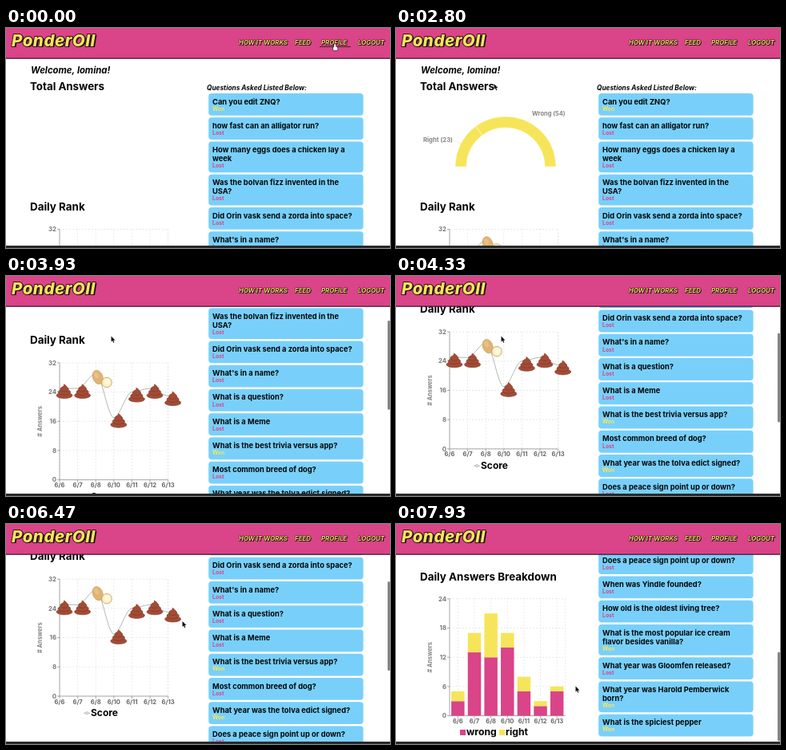
Write an HTML page with a canvas that moves like this. It is 480 by 276 pixels and loops after 8 s.

```html
<!DOCTYPE html>
<html lang="en">
<head>
<meta charset="utf-8">
<title>Trivia profile</title>
<style>
  html, body { margin: 0; width: 100%; height: 100%; overflow: hidden; background: #fff; }
  canvas { display: block; }
</style>
</head>
<body>
<canvas id="stage" width="480" height="276"></canvas>
<script>
const ctx = document.getElementById('stage').getContext('2d');
const LOOP = 8000;
const PINK = '#da4489', YELLOW = '#f6e55a', BLUE = '#78d0fa', GRAY = '#858585', BLACK = '#050505';

// Page positions are measured with the page scrolled to the top.
const SCROLL = [[0, 0], [2900, 0], [3200, 12], [3530, 51], [3950, 148], [4330, 182.4],
  [4800, 183.3], [6750, 183.3], [7100, 215], [7400, 280.8], [7700, 375], [7930, 401.5], [8000, 401.5]];
const POINTER = [[0, 411, 20], [200, 411, 20], [870, 410, 130], [1730, 370, 190], [2550, 122.5, 70],
  [2900, 122.5, 70], [3450, 131.5, 75.5], [4400, 131.5, 75.5], [5200, 333, 52], [5400, 207, 116],
  [5650, 207, 116], [6400, 220.5, 122], [6600, 220.5, 122], [7250, 224.5, 203.5], [8000, 224.5, 203.5]];

const QUESTIONS = [
  ['Can you edit ZNQ?', 1],
  ['how fast can an alligator run?'],
  ['How many eggs does a chicken lay a|week'],
  ['Was the bolvan fizz invented in the|USA?'],
  ['Did Orin vask send a zorda into space?'],
  ["What's in a name?"],
  ['What is a question?'],
  ['What is a Meme'],
  ['What is the best trivia versus app?', 1],
  ['Most common breed of dog?'],
  ['What year was the tolva edict signed?', 1],
  ['Does a peace sign point up or down?'],
  ['When was Yindle founded?'],
  ['How old is the oldest living tree?'],
  ['What is the most popular ice cream|flavor besides vanilla?', 1],
  ['What year was Gloomfen released?'],
  ['What year was Harold Pemberwick|born?', 1],
  ['What is the spiciest pepper', 1],
];
const DAYS = ['6/6', '6/7', '6/8', '6/10', '6/11', '6/12', '6/13'];
const SCORES = [25, 25, 29, 17, 24, 25, 23];
const WRONG = [3, 13, 12, 14, 5, 2, 5];
const RIGHT = [2, 4, 9, 3, 3, 1, 1];

function track(keys, t) {
  const i = Math.max(1, keys.findIndex(k => k[0] >= t));
  const a = keys[i - 1], b = keys[i];
  const p = (t - a[0]) / (b[0] - a[0]);
  return a.slice(1).map((v, n) => v + (b[n + 1] - v) * p);
}

const progress = (t, start, length) => Math.min(1, Math.max(0, (t - start) / length));
const ease = p => p * p * (3 - 2 * p) * 0.4 + (1 - (1 - p) ** 2.5) * 0.6;

function text(str, x, y, size, color = BLACK, { align = 'left', weight = 700, italic = false } = {}) {
  ctx.font = `${italic ? 'italic ' : ''}${weight} ${size}px Inter, sans-serif`;
  ctx.textAlign = align;
  ctx.fillStyle = color;
  ctx.fillText(str, x, y);
}

function rect(x, y, w, h, color, radius = 0) {
  ctx.fillStyle = color;
  ctx.beginPath();
  ctx.roundRect(x, y, w, h, radius);
  ctx.fill();
}

function line(x1, y1, x2, y2, color, width = 0.7) {
  ctx.strokeStyle = color;
  ctx.lineWidth = width;
  ctx.beginPath();
  ctx.moveTo(x1, y1);
  ctx.lineTo(x2, y2);
  ctx.stroke();
}

function ellipse(x, y, rx, ry, color, angle = 0, edge) {
  ctx.beginPath();
  ctx.ellipse(x, y, rx, ry, angle, 0, 2 * Math.PI);
  ctx.fillStyle = color;
  ctx.fill();
  if (edge) {
    ctx.strokeStyle = edge;
    ctx.lineWidth = 0.7;
    ctx.stroke();
  }
}

function drawCards() {
  let y = 82;
  for (const [question, won] of QUESTIONS) {
    const lines = question.split('|');
    const extra = (lines.length - 1) * 11;
    rect(253.2, y, 193.4, 27.8 + extra, BLUE, 4);
    lines.forEach((str, i) => text(str, 258, y + 13.6 + i * 11, 9.3));
    text(won ? 'Won' : 'Lost', 258, y + 21.7 + extra, 6.9, won ? YELLOW : PINK);
    y += 30.25 + extra;
  }
}

function drawPie(t) {
  const p = ease(progress(t, 500, 1450));
  const cx = 137, cy = 174, outer = 63, inner = 49;
  let from = Math.PI;
  for (const count of [23, 54]) {
    const to = from + Math.PI * count / 77 * p;
    if (p > 0) {
      ctx.beginPath();
      ctx.arc(cx, cy, outer, from, to);
      ctx.arc(cx, cy, inner, to, from, true);
      ctx.closePath();
      ctx.fillStyle = YELLOW;
      ctx.fill();
      ctx.strokeStyle = '#fff';
      ctx.lineWidth = 0.5;
      ctx.stroke();
    }
    if (p === 1) {
      const mid = (from + to) / 2, dx = Math.cos(mid), dy = Math.sin(mid);
      line(cx + dx * outer, cy + dy * outer, cx + dx * 72, cy + dy * 72, '#f3eaa0', 0.6);
    }
    from = to;
  }
  if (p === 1) {
    text('Right (23)', 71, 143, 7.7, GRAY, { align: 'right' });
    text('Wrong (54)', 170, 110.3, 7.5, GRAY);
  }
}

function drawAxes(top, right, max, tickX) {
  const bottom = top + 146.8;
  ctx.setLineDash([2, 2]);
  for (let i = 0; i < 5; i++) line(67, top + i * 36.7, right, top + i * 36.7, '#dcdcdc', 0.6);
  DAYS.forEach((_, i) => line(tickX(i), top, tickX(i), bottom, '#dcdcdc', 0.6));
  line(right, top, right, bottom, '#dcdcdc', 0.6);
  ctx.setLineDash([]);
  line(67, top, 67, bottom, GRAY);
  line(67, bottom, right, bottom, GRAY);
  for (let i = 0; i < 5; i++) {
    const y = top + i * 36.7;
    line(64, y, 67, y, GRAY);
    text(max - i * max / 4, 63, y + 2.7, 7.8, '#777', { align: 'right' });
  }
  DAYS.forEach((day, i) => {
    line(tickX(i), bottom, tickX(i), bottom + 3, GRAY);
    text(day, tickX(i), bottom + 9.6, 7.6, '#666', { align: 'center' });
  });
  ctx.save();
  ctx.translate(44.5, top + 73.5);
  ctx.rotate(-Math.PI / 2);
  text('# Answers', 0, 0, 7.4, GRAY, { align: 'center' });
  ctx.restore();
}

function drawPile(x, y) {
  const fill = '#a34c36', edge = '#82392a';
  ellipse(x, y + 5.3, 10, 3.7, fill, 0, edge);
  ellipse(x, y + 1.2, 7.6, 3.7, fill, 0, edge);
  ellipse(x, y - 2.7, 5, 3.3, fill, 0, edge);
  ctx.beginPath();
  ctx.moveTo(x - 4, y - 3.5);
  ctx.quadraticCurveTo(x - 0.5, y - 6, x - 0.8, y - 9.3);
  ctx.quadraticCurveTo(x + 3.8, y - 7, x + 4, y - 3.2);
  ctx.fillStyle = fill;
  ctx.fill();
}

function drawPotatoes(x, y) {
  ellipse(x, y, 6.3, 9, '#e0b475', -0.35, '#cfa063');
  ellipse(x - 1.5, y - 2.5, 2.5, 4, '#e8c186', -0.35);
  ellipse(x + 11.3, y + 6.5, 6.3, 6.3, '#f8f0c6', 0, '#b98b4c');
  ellipse(x + 11.8, y + 6, 3.5, 3.6, '#fdf8dc');
}

function drawRankChart(t) {
  const top = 252.5, bottom = top + 146.8;
  const px = i => 67 + i * 22.6;
  const py = v => bottom - v * 146.8 / 32;
  drawAxes(top, px(6), 32, px);

  ctx.save();
  ctx.beginPath();
  ctx.rect(60, top - 20, 7 + 136 * ease(progress(t, 100, 1500)), 190);
  ctx.clip();
  ctx.beginPath();
  ctx.moveTo(px(0), py(SCORES[0]));
  for (let i = 1; i < SCORES.length; i++) {
    const a = py(SCORES[i - 1]), b = py(SCORES[i]);
    ctx.bezierCurveTo(px(i - 1) + 7.5, a, px(i) - 7.5, b, px(i), b);
  }
  ctx.strokeStyle = '#8f9a8e';
  ctx.lineWidth = 0.7;
  ctx.stroke();
  ctx.restore();

  if (t >= 1600) SCORES.forEach((v, i) => {
    if (v > 25) drawPotatoes(px(i) + 2.5, py(v) + 4.3);
    else drawPile(px(i) + 6, py(v) + 3.5);
  });

  line(97, 420.5, 105, 420.5, '#8f9a8e');
  ellipse(101, 420.5, 1.5, 1.5, '#fff', 0, '#8f9a8e');
  text('Score', 106, 424.2, 12);
}

function drawBarChart() {
  const top = 495.3, bottom = top + 146.8, unit = 146.8 / 24, step = 144.5 / 7;
  drawAxes(top, 211.5, 24, i => 67 + (i + 0.5) * step);
  WRONG.forEach((wrong, i) => {
    const x = 69.1 + i * step, y = bottom - wrong * unit, h = RIGHT[i] * unit;
    rect(x, y, 16.5, wrong * unit, PINK);
    rect(x, y - h, 16.5, h, YELLOW);
  });
  rect(80, 659.5, 7, 7, PINK);
  text('wrong', 88, 666.5, 12.2);
  rect(129, 659.5, 7, 7, YELLOW);
  text('right', 137, 666.5, 12.2);
}

function drawPage(t, scroll) {
  ctx.save();
  ctx.translate(0, -scroll);
  text('Welcome, lomina!', 31, 57, 11.3, BLACK, { italic: true });
  text('Total Answers', 30, 77.5, 13.3);
  text('Questions Asked Listed Below:', 251, 77.5, 8.3, BLACK, { italic: true });
  text('Daily Rank', 30, 228.5, 13.4);
  text('Daily Answers Breakdown', 30, 472, 13.4);
  drawPie(t);
  drawRankChart(t);
  drawBarChart();
  drawCards();
  ctx.restore();
}

function shadowText(str, x, y, size, depth, weight) {
  for (const d of [depth, depth / 2]) text(str, x + d, y + d, size, '#1a0d14', { italic: true, weight });
  ctx.strokeStyle = '#2b1420';
  ctx.lineWidth = depth;
  ctx.lineJoin = 'round';
  ctx.strokeText(str, x, y);
  text(str, x, y, size, YELLOW, { italic: true, weight });
}

function drawHeader(t) {
  rect(0, 0, 480, 38.7, '#3d1129');
  rect(0, 0, 480, 37.5, PINK);
  ctx.letterSpacing = '0.5px';
  shadowText('PonderOll', 7, 22.5, 20.5, 1.8, 800);
  ctx.letterSpacing = '0px';
  const links = [['HOW IT WORKS', 291], ['FEED', 361], ['PROFILE', 394], ['LOGOUT', 440]];
  for (const [label, x] of links) shadowText(label, x, 20.8, 7.9, 0.9, 600);
  if (t < 270) line(392, 23.5, 431, 23.5, '#4a1a30', 1);
}

function drawHand(x, y) {
  ctx.beginPath();
  ctx.roundRect(x - 0.8, y, 2, 6, 1);
  ctx.roundRect(x - 2, y + 3.5, 5.5, 4.5, 1.5);
  ctx.strokeStyle = '#111';
  ctx.lineWidth = 1.2;
  ctx.stroke();
  ctx.fillStyle = '#fff';
  ctx.fill();
}

function drawArrow(x, y) {
  ctx.save();
  ctx.translate(x, y);
  ctx.beginPath();
  for (const [dx, dy] of [[0, 0], [0, 7], [1.6, 5.6], [2.7, 8.2], [3.8, 7.7], [2.8, 5.2], [4.9, 5]]) ctx.lineTo(dx, dy);
  ctx.closePath();
  ctx.strokeStyle = '#fff';
  ctx.lineWidth = 1;
  ctx.stroke();
  ctx.fillStyle = '#111';
  ctx.fill();
  ctx.restore();
}

function draw(t) {
  const [scroll] = track(SCROLL, t);
  const [x, y] = track(POINTER, t);
  rect(0, 0, 480, 276, '#fff');
  drawPage(t, scroll);
  if (t > 2900 && t < 5700 || t > 6400) rect(477, -2.5 + scroll * 0.406, 3, 112, '#858585', 1.5);
  drawHeader(t);
  rect(0, 273, 480, 3, '#2a2a2c');
  (t < 270 ? drawHand : drawArrow)(x, y);
}

function tick(now) {
  draw(now % LOOP);
  requestAnimationFrame(tick);
}
requestAnimationFrame(tick);
</script>
</body>
</html>
```
